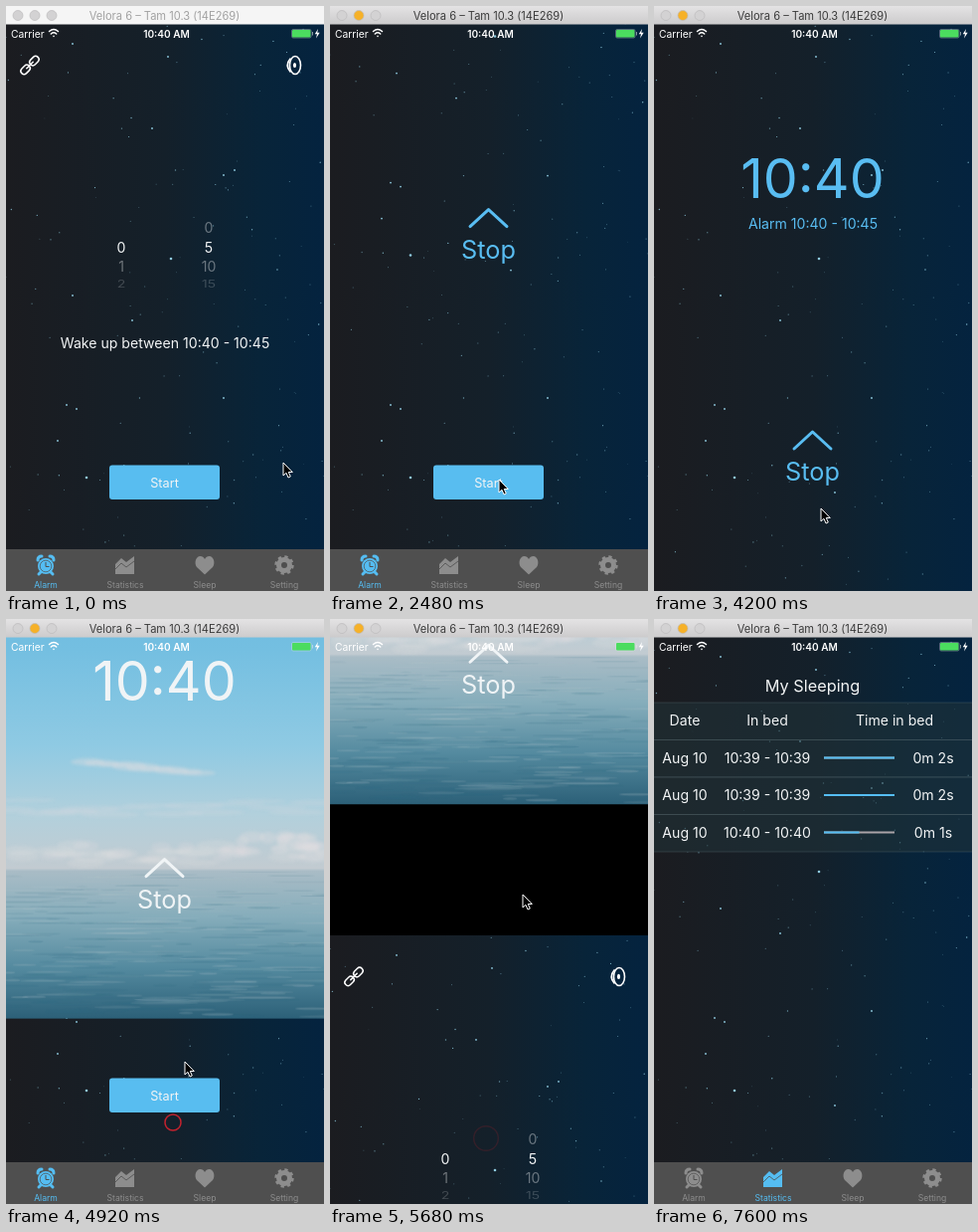
Animation, 320 px wide and 588 px high, one loop 7.64 s. Source, as an HTML page:

```html
<!DOCTYPE html>
<html lang="en">
<head>
<meta charset="utf-8">
<title>Sleep alarm</title>
<style>
html, body { margin: 0; height: 100%; overflow: hidden; background: #000; }
svg { display: block; width: 100%; height: 100%; }
text { font: 14.1px Inter, "Open Sans", sans-serif; fill: #f2f4f5; text-anchor: middle; }
.left { text-anchor: start; }
.line { fill: none; stroke: currentColor; stroke-linecap: round; stroke-linejoin: round; }
.tab { color: #8d8d8d; }
.tab.on { color: #55bdf2; }
.tab text { font-size: 8.6px; fill: currentColor; }
.big { color: #59bdf2; }
.big text { fill: currentColor; }
.big .clock { font-size: 55.5px; }
.big .stop { font-size: 25.3px; }
#morning { color: #f0f4f6; }
#status text { font-size: 10.3px; fill: #fff; }
#title { font-size: 11.1px; }
</style>
</head>
<body>
<svg viewBox="0 0 320 588" preserveAspectRatio="none">
  <defs>
    <linearGradient id="night">
      <stop offset="0" stop-color="#1b1c20"/>
      <stop offset=".5" stop-color="#14202a"/>
      <stop offset=".8" stop-color="#082439"/>
      <stop offset="1" stop-color="#04233f"/>
    </linearGradient>
    <linearGradient id="day" x2="0" y2="1">
      <stop offset="0" stop-color="#5cb0dc"/>
      <stop offset=".35" stop-color="#74bfe1"/>
      <stop offset=".52" stop-color="#8fcae3"/>
      <stop offset=".64" stop-color="#b2d0dc"/>
      <stop offset=".735" stop-color="#c2cbd1"/>
      <stop offset=".74" stop-color="#a9bcc6"/>
      <stop offset=".82" stop-color="#86adbb"/>
      <stop offset=".91" stop-color="#548a9f"/>
      <stop offset="1" stop-color="#2c6078"/>
    </linearGradient>
    <linearGradient id="chrome" x2="0" y2="1">
      <stop stop-color="#e4e3e4"/><stop offset="1" stop-color="#cccbcc"/>
    </linearGradient>
    <filter id="soft"><feGaussianBlur stdDeviation="1.7"/></filter>
    <g id="space">
      <rect y="18" width="320" height="570" fill="url(#night)"/>
      <g id="stars"></g>
    </g>
    <path id="chevron" class="line" d="M141 445L159.500 428L178 445" stroke-width="3"/>
  </defs>

  <rect width="320" height="588"/>

  <g id="home">
    <use href="#space"/>
    <g id="alarmPage">
      <g class="line" color="#fff" stroke-width="1.500" transform="translate(24 59.500) rotate(-45)">
        <rect x="-11.500" y="-3.300" width="10.500" height="6.600" rx="3.300"/>
        <rect x="1" y="-3.300" width="10.500" height="6.600" rx="3.300"/>
        <path d="M-4.500 0H4.500"/>
      </g>
      <g class="line" color="#fff" stroke-width="1.600">
        <ellipse cx="291" cy="59.500" rx="5.500" ry="9"/>
        <path d="M286 53Q280.500 59.500 286 66"/>
        <ellipse cx="290.500" cy="59.500" rx=".8" ry="1.800"/>
      </g>
      <text x="116" y="248">0</text>
      <text x="116" y="267" opacity=".4">1</text>
      <text transform="translate(116 283) scale(1 .7)" opacity=".2">2</text>
      <text x="204" y="228" opacity=".4">0</text>
      <text x="204" y="248">5</text>
      <text x="204" y="267" opacity=".4">10</text>
      <text transform="translate(204 283) scale(1 .7)" opacity=".2">15</text>
      <text x="160" y="343.500">Wake up between 10:40 - 10:45</text>
      <rect x="104" y="461.500" width="111" height="34.500" rx="3" fill="#58bdf0"/>
      <text x="159.500" y="483.500" style="font-size:12.7px">Start</text>
    </g>
    <g id="statsPage">
      <text x="159.500" y="73" style="font-size:16.300px">My Sleeping</text>
      <g id="table"></g>
    </g>
    <rect y="546" width="320" height="42" fill="#4f4f4f"/>
    <g class="tab" transform="translate(40 562)">
      <circle cy="1" r="8" fill="currentColor"/>
      <path class="line" stroke-width="3" d="M-8-5Q-8-9-4-9M8-5Q8-9 4-9M-5 7L-7 9M5 7L7 9"/>
      <circle cy="1" r="5.800" fill="none" stroke="#4f4f4f" stroke-width=".7"/>
      <path d="M0-3V1.500H3.500" fill="none" stroke="#4f4f4f"/>
      <text y="23">Alarm</text>
    </g>
    <g class="tab" transform="translate(120 562)">
      <path fill="currentColor" d="M-10 9V-1L-4-7L1-3L9-9V9Z"/>
      <path d="M-10 4L-4-2L1 2L9-4" fill="none" stroke="#4f4f4f" stroke-width=".8"/>
      <text y="23">Statistics</text>
    </g>
    <g class="tab" transform="translate(200 562)">
      <path fill="currentColor" d="M0 9.500L-8 2C-11-2-9-9-4.500-9Q-1.500-9 0-6Q1.500-9 4.500-9C9-9 11-2 8 2Z"/>
      <text y="23">Sleep</text>
    </g>
    <g class="tab" transform="translate(280 562)">
      <circle r="5.500" fill="none" stroke="currentColor" stroke-width="5"/>
      <circle r="8.500" fill="none" stroke="currentColor" stroke-width="2.400" stroke-dasharray="3.340"/>
      <text y="23">Setting</text>
    </g>
  </g>

  <g id="sleep" class="big">
    <use href="#space"/>
    <text class="clock" x="159.500" y="193">10:40</text>
    <text x="160" y="224">Alarm 10:40 - 10:45</text>
    <use href="#chevron"/>
    <text class="stop" x="159.500" y="477">Stop</text>
  </g>

  <g id="morning" class="big">
    <rect y="18" width="320" height="570" fill="url(#day)"/>
    <g id="clouds" filter="url(#soft)"></g>
    <g id="waves"></g>
    <text class="clock" x="159.500" y="268">10:40</text>
    <use href="#chevron"/>
    <text class="stop" x="159.500" y="477">Stop</text>
  </g>

  <g id="status">
    <text class="left" x="5" y="31.500">Carrier</text>
    <g class="line" color="#fff" stroke-width="1.500">
      <path d="M43.500 25.500Q48 21.500 52.500 25.500M45.300 28Q48 25.500 50.700 28M48 30.300V30.400"/>
    </g>
    <text x="161.500" y="31.500" style="font-weight:600;font-size:10.1px">10:40 AM</text>
    <rect x="287.500" y="23.500" width="19.500" height="8.500" rx="1.500" fill="none" stroke="#dfe6e3" stroke-width=".6" opacity=".6"/>
    <rect x="288" y="24" width="18.500" height="7.500" rx="1" fill="#4bdc5f"/>
    <path d="M308.500 26V29.500" stroke="#dfe6e3" opacity=".6"/>
    <path d="M314 23L310.800 28.300H313L312 32.500L315.700 26.800H313.300Z" fill="#fff"/>
  </g>

  <g id="bar">
    <rect id="barFill" width="320" height="18.500"/>
    <g stroke="#bcbabc" stroke-width=".7" fill="#d3d2d3">
      <circle cx="12" cy="9.500" r="5"/>
      <circle id="minimize" cx="29" cy="9.500" r="5"/>
      <circle cx="46" cy="9.500" r="5"/>
    </g>
    <text id="title" x="159.500" y="13.500">Velora 6 – Tam 10.3 (14E269)</text>
  </g>

  <circle id="ring" fill="none" stroke="#c3222e" stroke-width="1.500"/>
  <path id="cursor" d="M0 0V13L3 10.300L5 15L7.300 14L5.300 9.500H9.300Z" stroke="#fff" stroke-width="1"/>
</svg>
<script>
const LOOP = 7640, HEIGHT = 570, SLIDE = 400;
const $ = id => document.getElementById(id);
const tabs = document.querySelectorAll('.tab');

let seed = 11;
const rnd = () => (seed = seed * 16807 % 2147483647) / 2147483647;
const repeat = (n, make) => Array.from({ length: n }, (_, i) => make(i)).join('');

// Night sky: the bright stars, then faint scattered ones
const bright = [[166, 254], [81, 474], [182, 489], [219, 394], [67, 291], [52, 437], [147, 123],
  [219, 170], [163, 51], [230, 165], [67, 38], [127, 316], [71, 405], [61, 401]];
const star = (x, y, r, o) => `<circle cx="${x}" cy="${y}" r="${r}" fill="#8fcbe0" opacity="${o}"/>`;
$('stars').innerHTML =
  bright.map(([x, y], i) => star(x, y, i < 2 ? 1.3 : .9, 1)).join('') +
  repeat(140, () => star(rnd() * 320, 20 + rnd() * 565, .4 + rnd() * .35, .3 + rnd() * .6));

// Morning sky: cloud bank, two streaks and the ripples of the sea
const cloud = (x, y, rx, ry, o) =>
  `<ellipse cx="${x}" cy="${y}" rx="${rx}" ry="${ry}" fill="#dfdde0" opacity="${o}"/>`;
$('clouds').innerHTML =
  repeat(45, () => cloud(rnd() * 320, 412 + rnd() * 20, 6 + rnd() * 18, 2 + rnd() * 4, .25)) +
  repeat(16, () => cloud(235 + rnd() * 85, 402 + rnd() * 18, 6 + rnd() * 9, 3 + rnd() * 4, .35)) +
  repeat(9, i => cloud(82 + i * 14, 330 + i * 1.4, 17, 2 + rnd() * 3, .38)) +
  repeat(16, i => cloud(i * 21, 367 + rnd() * 16, 30, 1.5 + rnd() * 2, .2));
$('waves').innerHTML = repeat(260, i => {
  const depth = rnd(), y = 440 + depth * 146, w = 6 + rnd() * 32;
  return `<ellipse cx="${rnd() * 320}" cy="${y}" rx="${w}" ry="${.4 + depth * .9}"
    fill="${i % 2 ? '#b6c6cc' : '#2d6982'}" opacity="${.1 + rnd() * .14}"/>`;
});

// Sleep table
const cell = (x, y, s) => `<text x="${x}" y="${y}">${s}</text>`;
function row(i, day, span, length, share) {
  const top = 84 + i * 37.5, y = top + 23;
  const bar = (from, to, color) =>
    `<path d="M${from} ${top + 18}H${to}" stroke="${color}" stroke-width="2"/>`;
  return `<rect y="${top}" width="320" height="37.5" fill="#22343a" opacity=".55"/>
    <path d="M0 ${top}H320M0 ${top + 37.5}H320" stroke="#64767c" stroke-width=".6" opacity=".5"/>` +
    cell(31, y, day) + cell(114, y, span) + cell(share ? 281 : 242, y, length) +
    (share ? bar(171, 242, '#aaa3a8') + bar(171, 171 + 71 * share, '#55bdf2') : '');
}
$('table').innerHTML =
  row(0, 'Date', 'In bed', 'Time in bed') +
  row(1, 'Aug 10', '10:39 - 10:39', '0m 2s', 1) +
  row(2, 'Aug 10', '10:39 - 10:39', '0m 2s', 1) +
  `<g id="newRow">${row(3, 'Aug 10', '10:40 - 10:40', '0m 1s', .5)}</g>`;

const pointer = [[0, 279, 459], [240, 279, 459], [760, 122, 562], [1160, 116, 560], [1360, 71, 505],
  [1640, 40, 560], [1760, 40, 560], [2180, 170, 476], [2500, 170, 476], [2900, 168, 505],
  [4260, 168, 505], [4920, 180, 445], [5180, 157, 522], [5300, 157, 522], [5680, 194, 277],
  [6000, 190, 320], [6640, 118, 560], [6900, 118, 560], [7300, 150, 610], [LOOP, 150, 610]];

const ease = x => (x = Math.min(1, Math.max(0, x)), x * x * (3 - 2 * x));
const show = (id, on) => $(id).style.display = on ? '' : 'none';
const move = (id, x, y) => $(id).setAttribute('transform', `translate(${x} ${y})`);

// A sheet drops in from the top; on leaving, home rises below it with a gap
function sheet(id, t, enter, leave) {
  const out = ease((t - leave) / SLIDE);
  show(id, t >= enter && t < leave + SLIDE);
  move(id, 0, -HEIGHT * (1 - ease((t - enter) / SLIDE)) - 848 * out);
  return t >= leave && t < leave + SLIDE ? HEIGHT * (1 - out) : 0;
}

function drawRing(t) {
  const [press, release, x, y] = t < 5200 ? [4260, 4930, 168, 506] : [5200, 5480, 157, 522];
  const fade = Math.min(1, Math.max(0, (t - release) / 350));
  show('ring', t >= press && fade < 1);
  move('ring', x, y);
  $('ring').setAttribute('r', 8 + 7.5 * fade);
  $('ring').setAttribute('opacity', (1 - fade) ** 2);
}

function draw(t) {
  const active = t >= 760;
  $('barFill').setAttribute('fill', active ? 'url(#chrome)' : '#f5f5f5');
  $('minimize').setAttribute('fill', active ? '#f6b128' : '#d3d2d3');
  $('title').style.fill = active ? '#3c3c3c' : '#a2a2a2';

  const stats = t >= 960 && t < 1700 || t >= 6760;
  show('statsPage', stats);
  show('alarmPage', !stats);
  show('newRow', t > 5000);
  tabs.forEach((tab, i) => tab.classList.toggle('on', i === +stats));

  const rise = sheet('sleep', t, 2252, 4274) + sheet('morning', t, 4674, 5488);
  move('home', 0, rise);

  const i = pointer.findIndex(p => p[0] > t);
  const [t0, x0, y0] = pointer[i - 1], [t1, x1, y1] = pointer[i];
  const k = ease((t - t0) / (t1 - t0));
  move('cursor', x0 + (x1 - x0) * k, y0 + (y1 - y0) * k);
  drawRing(t);
}

const start = performance.now();
function tick() {
  draw((performance.now() - start) % LOOP);
  requestAnimationFrame(tick);
}
tick();
</script>
</body>
</html>
```
